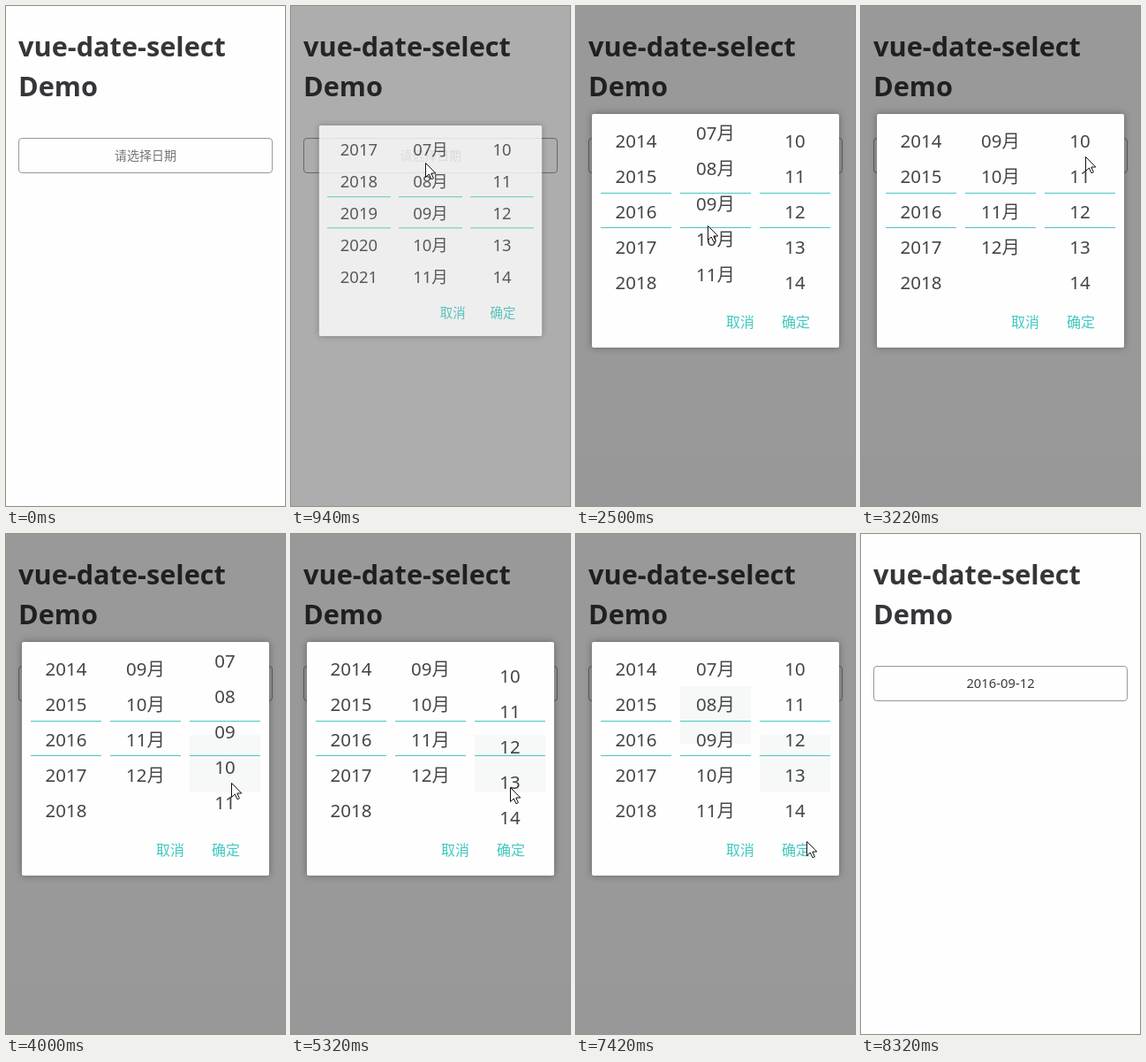
Animation, 316 px wide and 565 px high, one loop 8380 ms. Source, as an HTML page:

```html
<!DOCTYPE html>
<html lang="zh-CN">
<head>
<meta charset="utf-8">
<title>vue-date-select Demo</title>
<style>
  html, body { margin: 0; width: 100%; height: 100%; overflow: hidden; }
  body { background: #fefefe; font-family: "Noto Sans", "Noto Sans CJK SC", "Noto Sans CJK", sans-serif; }
  #stage { position: relative; width: 316px; height: 565px; overflow: hidden; }
  #stage * { box-sizing: border-box; }
  h1 { position: absolute; left: 14px; top: 23px; margin: 0; white-space: nowrap;
       font: 700 30.7px/45px "Open Sans", "Noto Sans", sans-serif; color: #36363a; }
  #field { position: absolute; left: 14px; top: 149px; width: 288px; height: 40px; border: 1px solid #999;
           border-radius: 4px; line-height: 38px; text-align: center; font-size: 14px; color: #757575; }
  #field.set { font-size: 14.8px; line-height: 36px; color: #3c3c3c; }
  #mask { position: absolute; inset: 0; background: rgba(0, 0, 0, .4); }
  #dialog { position: absolute; left: 18px; top: 122px; width: 280px; height: 264px;
            background: #fefefe; border-radius: 2px; box-shadow: 0 0 8px rgba(0, 0, 0, .35); }
  .col { position: absolute; top: 10px; width: 80px; height: 200px; overflow: hidden; }
  .patch { position: absolute; width: 80px; height: 65px; background: #f7f8f8; }
  .list { position: absolute; left: 0; top: 0; width: 80px; }
  .list div { position: absolute; width: 80px; height: 40px; line-height: 40px; text-align: center;
              font-size: 20.5px; color: #454545; white-space: nowrap; }
  .line { position: absolute; top: 79px; width: 80px; height: 40px; border: solid #48c8c0; border-width: 1px 0; }
  .btn { position: absolute; top: 215px; width: 60px; line-height: 40px; text-align: center;
         font-size: 16px; color: #42c8c0; }
  #cursor { position: absolute; left: 0; top: 0; overflow: visible; }
</style>
</head>
<body>
<div id="stage">
  <h1>vue-date-select<br>Demo</h1>
  <div id="field"></div>
  <div id="mask"></div>
  <div id="dialog">
    <span class="btn" style="left:138px">取消</span>
    <span class="btn" style="left:201px">确定</span>
  </div>
  <svg id="cursor" width="12" height="20">
    <path d="M.5 .5V16.5L4.3 13L7 18.8L9.4 17.7L6.8 12H11.8Z" fill="#fff" stroke="#111"/>
  </svg>
</div>
<script>
const LOOP = 8380, STEP = 60, ROW = 40, LEAD = 100;
const OPEN = 790, CLOSE = 7615, GONE = 7780, FADE = 300, PAUSE = 120;
const $ = id => document.getElementById(id);
const field = $('field'), mask = $('mask'), dialog = $('dialog'), cursor = $('cursor');
const pad = n => String(n).padStart(2, '0');

const wheels = [
  { from: 2000, to: 2030, start: 2019, label: String },
  { from: 1, to: 12, start: 9, label: n => pad(n) + '月' },
  { from: 1, to: 30, start: 12, label: pad }
];

// drags of a wheel by a number of rows; a touched wheel may keep a faint patch
const drags = [
  { wheel: 0, at: 1360, len: 600, x: 80, y: 170, rows: 3, arrive: 1120 },
  { wheel: 1, at: 2420, len: 380, x: 149, y: 257, rows: -2 },
  { wheel: 2, at: 3220, len: 420, x: 254, y: 170, rows: 3 },
  { wheel: 2, at: 3920, len: 560, x: 255, y: 290, rows: -4, patch: 95 },
  { wheel: 2, at: 4900, len: 420, x: 248, y: 238, rows: 1.2 },
  { wheel: 1, at: 6160, len: 610, x: 155, y: 153, rows: 2, arrive: 5980, patch: 40 }
];

// where the pointer rests, in order
const stops = [
  { arrive: 100, leave: 100, x: 312, y: 38 },
  { arrive: 700, leave: 940, x: 152, y: 177 },
  ...drags.map(d => ({ arrive: d.at - STEP, leave: d.at + d.len + PAUSE, ...d, drag: d })),
  { arrive: 7480, leave: 7960, x: 264, y: 350 },
  { arrive: 8260, leave: LOOP, x: 291, y: 325 }
];

const mix = (a, b, u) => a + (b - a) * u;
const smooth = u => {
  u = Math.min(1, Math.max(0, u));
  return u * u * (3 - 2 * u);
};
const pulled = (d, t) => d.rows * smooth((t - d.at) / d.len);

// cubic-bezier(.25, .1, .25, 1)
function ease(x) {
  if (x <= 0) return 0;
  if (x >= 1) return 1;
  const bez = (p, q, s) => 3 * p * s * (1 - s) ** 2 + 3 * q * s * s * (1 - s) + s ** 3;
  let lo = 0, hi = 1;
  for (let i = 0; i < 24; i++) {
    const mid = (lo + hi) / 2;
    if (bez(.25, .25, mid) < x) lo = mid; else hi = mid;
  }
  return bez(.1, 1, lo);
}

// centred value: every drag, then its snap to a whole row
function valueAt(i, t) {
  return drags.filter(d => d.wheel === i).reduce((v, d) => {
    const snap = ease((t - d.at - d.len - PAUSE) / FADE);
    return v - pulled(d, t) - (Math.round(d.rows) - d.rows) * snap;
  }, wheels[i].start);
}

function pointerAt(t) {
  const place = s => ({ x: s.x, y: s.y + (s.drag ? pulled(s.drag, t) * ROW : 0) });
  const i = Math.max(0, stops.findLastIndex(s => s.arrive <= t));
  const a = place(stops[i]), next = stops[i + 1];
  if (!next || t <= stops[i].leave) return a;
  const b = place(next), u = smooth((t - stops[i].leave) / (next.arrive - stops[i].leave));
  return { x: mix(a.x, b.x, u), y: mix(a.y, b.y, u) };
}

function add(parent, cls, style = {}) {
  const el = document.createElement('div');
  el.className = cls;
  Object.assign(el.style, style);
  return parent.appendChild(el);
}

wheels.forEach((w, i) => {
  const col = add(dialog, 'col', { left: 10 + 90 * i + 'px' });
  for (const d of drags)
    if (d.wheel === i && d.patch) d.el = add(col, 'patch', { top: d.patch + 'px' });
  w.list = add(col, 'list');
  for (let n = w.from; n <= w.to; n++)
    add(w.list, '', { top: (n - w.from) * ROW + 'px' }).textContent = w.label(n);
  add(col, 'line');
});

const show = (el, on) => { el.style.display = on ? '' : 'none'; };

function draw(t) {
  const chosen = t >= CLOSE;
  field.textContent = chosen ? '2016-09-12' : '请选择日期';
  field.className = chosen ? 'set' : '';

  const shown = t >= GONE ? 0 : ease((t - OPEN) / FADE) - ease((t - CLOSE) / FADE);
  for (const el of [mask, dialog]) {
    show(el, shown > 0);
    el.style.opacity = shown;
  }
  dialog.style.transform = shown < 1 ? `scale(${.5 + shown / 2})` : 'none';

  wheels.forEach((w, i) => {
    const y = (w.from + 2 - valueAt(i, t)) * ROW;
    w.list.style.transform = `translateY(${Math.round(y)}px)`;
  });
  for (const d of drags) if (d.el) show(d.el, t >= d.at);

  const p = pointerAt(t);
  show(cursor, t >= LEAD && t < LOOP - STEP);
  cursor.style.transform = `translate(${Math.round(p.x)}px, ${Math.round(p.y)}px)`;
}

const began = performance.now();
function tick() {
  const t = (performance.now() - began) % LOOP;
  draw(t < LEAD ? 0 : LEAD + Math.floor((t - LEAD) / STEP) * STEP);
  requestAnimationFrame(tick);
}
tick();
</script>
</body>
</html>
```
